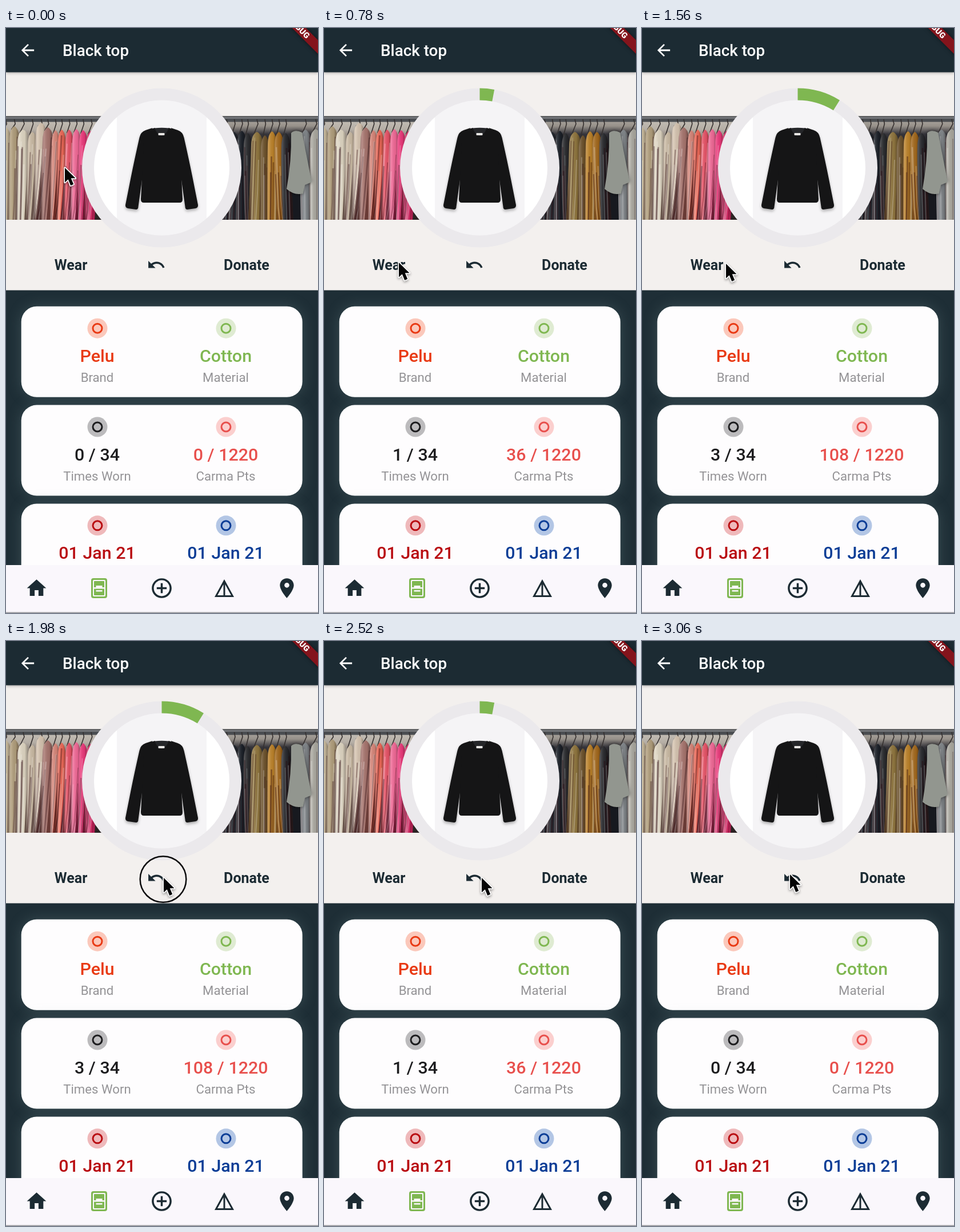
Write an HTML page with a canvas that moves like this. It is 546 by 1025 pixels and loops after 3.12 s.

```html
<!DOCTYPE html>
<html lang="en">
<head>
<meta charset="utf-8">
<title>Wardrobe item</title>
<style>
html, body { margin: 0; width: 100%; height: 100%; overflow: hidden; background: #1e2d35; }
canvas { display: block; width: 546px; height: 1025px; }
</style>
</head>
<body>
<canvas id="stage" width="546" height="1025"></canvas>
<script>
const W = 546, H = 1025, LOOP = 3120, STEP = 60;
const INK = '#1c2b33', PAPER = '#f3f0ee', GREEN = '#7fb751', NAV = '#faf7fc';
const CX = 272.5, CY = 245;
const CARD_TOP = 487.8, CARD_PITCH = 172.8;

const ICONS = {
  back: 'M20 11H7.83l5.59-5.59L12 4l-8 8 8 8 1.41-1.41L7.83 13H20v-2z',
  undo: 'M12.5 8c-2.65 0-5.05.99-6.9 2.6L2 7v9h9l-3.62-3.62c1.39-1.16 3.16-1.88 5.12-1.88 3.54 0 6.55 2.31 7.6 5.5l2.37-.78C21.08 11.03 17.15 8 12.5 8z',
  home: 'M10 20v-6h4v6h5v-8h3L12 3 2 12h3v8z',
  add: 'M13 7h-2v4H7v2h4v4h2v-4h4v-2h-4V7zm-1-5C6.48 2 2 6.48 2 12s4.48 10 10 10 10-4.48 10-10S17.52 2 12 2zm0 18c-4.41 0-8-3.59-8-8s3.59-8 8-8 8 3.59 8 8-3.59 8-8 8z',
  pin: 'M12 2C8.13 2 5 5.13 5 9c0 5.25 7 13 7 13s7-7.75 7-13c0-3.87-3.13-7-7-7zm0 9.5c-1.38 0-2.5-1.12-2.5-2.5s1.12-2.5 2.5-2.5 2.5 1.12 2.5 2.5-1.12 2.5-2.5 2.5z'
};

// Pointer path: time, x, y
const PATH = [
  [0, 102, 245], [60, 102, 245], [420, 130, 411], [1440, 130, 411], [1560, 146, 413],
  [1620, 150, 413], [1860, 275, 415], [2880, 275, 415], [3060, 258, 409]
];
// Press time and the change it makes on release
const CLICKS = [[600, 1], [900, 1], [1260, 1], [1920, -1], [2220, -1], [2700, -1]];
const HOLD = 120;

const stage = document.getElementById('stage').getContext('2d');
let g = stage;

let seed = 7;
function random() {
  seed = seed * 16807 % 2147483647;
  return seed / 2147483647;
}

function box(x, y, w, h, fill, r = 0) {
  g.fillStyle = fill;
  g.beginPath();
  g.roundRect(x, y, w, h, r);
  g.fill();
}

function disc(x, y, r, fill) {
  g.fillStyle = fill;
  g.beginPath();
  g.arc(x, y, r, 0, 7);
  g.fill();
}

function line(color, width, ...pts) {
  g.strokeStyle = color;
  g.lineWidth = width;
  g.beginPath();
  pts.forEach(([x, y]) => g.lineTo(x, y));
  g.stroke();
}

function text(str, x, y, size, weight, color, align = 'center') {
  g.font = `${weight} ${size}px Roboto, sans-serif`;
  g.textAlign = align;
  g.fillStyle = color;
  g.fillText(str, x, y);
}

function icon(name, x, y, scale, color) {
  g.save();
  g.translate(x - 12 * scale, y - 12 * scale);
  g.scale(scale, scale);
  g.fillStyle = color;
  g.fill(new Path2D(ICONS[name]));
  g.restore();
}

function shadow(color, blur, dy = 0) {
  g.shadowColor = color;
  g.shadowBlur = blur;
  g.shadowOffsetY = dy;
}

function fade(y0, y1, ...stops) {
  const f = g.createLinearGradient(0, y0, 0, y1);
  stops.forEach(([at, color]) => f.addColorStop(at, color));
  return f;
}

// One hanging garment: left, width, shoulder height, colour, lean
function garment(x, w, top, color, lean) {
  const low = x + lean;
  g.save();
  line('#35302f', 1.6, [x + w * .5, 160], [x + w * .6, 168], [x + w * .2, top + 6]);
  g.beginPath();
  g.moveTo(low, 338);
  g.quadraticCurveTo(x - 1, 250, x, top + 22);
  g.quadraticCurveTo(x + 1, top + 4, x + w * .5, top);
  g.quadraticCurveTo(x + w, top + 4, x + w + 1, top + 26);
  g.quadraticCurveTo(x + w + 2, 250, low + w + 3, 338);
  g.closePath();
  g.fillStyle = color;
  g.fill();
  g.clip();
  const fold = g.createLinearGradient(x - 3, 0, x + w + 3, 0);
  fold.addColorStop(0, 'rgba(30,8,8,.6)');
  fold.addColorStop(.25, 'rgba(255,255,255,.16)');
  fold.addColorStop(.6, 'rgba(0,0,0,.06)');
  fold.addColorStop(1, 'rgba(30,8,8,.6)');
  g.fillStyle = fold;
  g.fillRect(x - 20, top, w + 50, 180);
  for (let i = 0; i < 5; i++) {
    const from = x + w * random(), y = top + 10 + 70 * random();
    const tone = i % 2 ? '255,255,255,.22' : '40,5,10,.34';
    line(`rgba(${tone})`, 1 + 2 * random(), [from, y], [from + lean * .4, y + 60], [from + lean, 338]);
  }
  g.restore();
}

function rack() {
  g.save();
  g.beginPath();
  g.rect(0, 154, W, 182);
  g.clip();
  box(0, 154, 272, 182, fade(154, 250, [0, '#c9c4bc'], [.25, '#b5aea5'], [.6, '#4a3c38'], [1, '#2b2323']));
  box(272, 154, 274, 182, fade(154, 225, [0, '#b5b0a9'], [.25, '#97918a'], [.45, '#35343a'], [1, '#17191f']));
  box(0, 154.5, W, 10, '#4a4d51');
  box(0, 156.5, W, 2, '#85878a');
  const left = [
    [-9, 17, 174, '#cfc0a1', -2], [6, 17, 172, '#b3a07d', -3], [20, 20, 178, '#e2d9c5', -3],
    [38, 16, 182, '#cdbda6', -6], [52, 19, 166, '#d8c6b2', -9], [64, 18, 174, '#a9766f', -13],
    [80, 13, 179, '#d9877a', -9], [91, 13, 178, '#f06a58', -9], [104, 13, 178, '#ea5468', -9],
    [116, 14, 177, '#f46a98', -9], [128, 14, 179, '#ee3a7c', -7], [140, 18, 180, '#d52864', -6]
  ];
  const right = [
    [378, 16, 181, '#20252c', -2], [392, 15, 182, '#24282f', -3], [405, 15, 180, '#1b2028', 0],
    [416, 14, 184, '#2b2c2f', 2], [429, 20, 182, '#927840', -5], [446, 14, 188, '#6d522b', 0],
    [458, 15, 181, '#bf842a', -1], [470, 15, 182, '#a56a1d', 5], [482, 15, 184, '#2a2b2f', 3],
    [515, 18, 178, '#858a8e', 1], [532, 20, 177, '#aaa89f', 0]
  ];
  left.concat(right).forEach(a => garment(...a));
  g.fillStyle = '#92968f';
  shadow('rgba(0,0,0,.6)', 6);
  g.fill(new Path2D('M499 184Q506 177 518 183L535 270L523 275L520 290Q505 294 491 282Q500 232 499 184Z'));
  shadow('transparent', 0);
  g.restore();
}

function sleeve(side) {
  g.save();
  g.translate(CX, 0);
  g.scale(side, 1);
  g.fill(new Path2D('M-16 175L-28 179Q-37 182 -39 192Q-48 232 -54 262L-63.5 310Q-64 315 -59 316L-45 318Q-41 318 -41 313L-35 270L-25 192Z'));
  g.restore();
}

function portrait() {
  disc(CX, CY, 129, '#fff');
  g.save();
  g.beginPath();
  g.arc(CX, CY, 119, 0, 7);
  g.clip();
  box(194, 120, 157, 250, '#f5f4f6');
  g.fillStyle = '#151516';
  shadow('rgba(0,0,0,.3)', 5, 3);
  sleeve(-1);
  sleeve(1);
  shadow('transparent', 0);
  g.fill(new Path2D('M260 175Q272.5 184 285 175L303 181L309 300Q309 306 304 306H241Q236 306 236 300L242 181Z'));
  g.fillStyle = '#252629';
  g.fill(new Path2D('M260 175.5Q272.5 174 285 175.5Q272.5 203 260 175.5Z'));
  box(266.5, 184, 11, 4, '#e8e6e3', 1);
  g.restore();
}

function ring(share) {
  g.lineWidth = 21;
  g.strokeStyle = '#ebe9ec';
  g.beginPath();
  g.arc(CX, CY, 129, 0, 7);
  g.stroke();
  if (!share) return;
  g.strokeStyle = GREEN;
  g.beginPath();
  g.arc(CX, CY, 129, -Math.PI / 2, -Math.PI / 2 + share * Math.PI * 2);
  g.stroke();
}

function badge(x, y, color, halo) {
  disc(x, y, 17.5, halo);
  g.strokeStyle = color;
  g.lineWidth = 3;
  g.beginPath();
  g.arc(x, y, 8, 0, 7);
  g.stroke();
}

function cellValue(value, row, column, color) {
  text(value, column ? 384.5 : 159.5, CARD_TOP + row * CARD_PITCH + 97, 30.4, 500, color);
}

function card(row, cells) {
  const y = CARD_TOP + row * CARD_PITCH;
  shadow('rgba(150,180,180,.22)', 26);
  box(26.7, y, 492, 159, '#fefdfe', 27);
  shadow('transparent', 0);
  cells.forEach(([value, label, color, halo], i) => {
    const x = i ? 385 : 160;
    badge(x, y + 38.4, color, halo);
    cellValue(value, row, i, color);
    text(label, x - .5, y + 132, 22.2, 400, '#949396');
  });
}

function debugBanner() {
  g.save();
  g.translate(W, 0);
  g.rotate(Math.PI / 4);
  shadow('rgba(0,0,0,.5)', 7);
  box(-80, 15, 120, 17, '#84141c');
  shadow('transparent', 0);
  text('DEBUG', -23.5, 28, 14.2, 900, '#fff');
  g.restore();
}

function navBar() {
  box(0, 941, W, 84, NAV);
  box(0, 1023.5, W, 1.5, '#97989c');
  icon('home', 53.5, 981.5, 1.69, INK);
  box(149, 964, 28, 35, GREEN, 4);
  box(152, 967, 22, 29, NAV, 2);
  box(154, 969, 18, 25, GREEN, 1);
  box(154, 980, 18, 2.5, NAV);
  box(157.5, 977, 11, 3.5, NAV);
  box(157.5, 985, 11, 2.5, NAV);
  icon('add', 272.5, 981.5, 1.736, INK);
  g.lineJoin = 'miter';
  g.strokeStyle = INK;
  g.lineWidth = 3;
  g.stroke(new Path2D('M382 969L367.5 995.5H396.5ZM382 969V995'));
  icon('pin', 491.5, 981.5, 1.736, INK);
}

function paintStill() {
  box(0, 0, W, H, '#1e2e36');
  card(0, [['Pelu', 'Brand', '#e93a14', '#fbc8bb'], ['Cotton', 'Material', GREEN, '#dfebd2']]);
  card(1, [['', 'Times Worn', '#1d1d1f', '#bcbbbd'], ['', 'Carma Pts', '#e8504d', '#fbcfce']]);
  card(2, [['01 Jan 21', 'Purchased', '#b90d12', '#efb9bb'], ['01 Jan 21', 'Last Worn', '#0b3d96', '#b3c6e5']]);
  box(0, 77, W, 382.5, PAPER);
  rack();
  shadow('rgba(0,0,0,.35)', 5, 1.5);
  box(0, 0, W, 77.5, INK);
  shadow('transparent', 0);
  icon('back', 38, 39, 1.389, '#fff');
  text('Black top', 99, 49, 27.8, 500, '#fff', 'left');
  debugBanner();
  portrait();
  text('Wear', 113.5, 424, 25, 700, INK);
  text('Donate', 421, 424, 25, 700, INK);
  icon('undo', 263, 415, 1.389, INK);
  navBar();
}

function pointerAt(t) {
  let i = 1;
  while (i < PATH.length - 1 && t > PATH[i][0]) i++;
  const [t0, x0, y0] = PATH[i - 1], [t1, x1, y1] = PATH[i];
  const p = Math.min(1, (t - t0) / (t1 - t0));
  const e = p * p * (3 - 2 * p);
  return [x0 + (x1 - x0) * e, y0 + (y1 - y0) * e];
}

function pointer(x, y, pressed) {
  if (pressed) {
    g.strokeStyle = '#0b0b0c';
    g.lineWidth = 2.5;
    g.beginPath();
    g.arc(x, y + 2.5, 40.3, 0, 7);
    g.stroke();
  }
  g.save();
  g.translate(x, y);
  const arrow = new Path2D('M1 0V25.5L6.8 20.2L11.2 31L16.2 28.8L11.8 18.3H19.5Z');
  g.lineJoin = 'round';
  g.strokeStyle = '#fff';
  g.lineWidth = 3.4;
  shadow('rgba(0,0,0,.4)', 4, 2);
  g.stroke(arrow);
  shadow('transparent', 0);
  g.fillStyle = '#050505';
  g.fill(arrow);
  g.restore();
}

const still = document.createElement('canvas');
still.width = W;
still.height = H;
g = still.getContext('2d');
paintStill();
g = stage;

const start = performance.now();

function draw(now) {
  const t = Math.floor(Math.max(0, now - start) % LOOP / STEP) * STEP;
  const worn = CLICKS.reduce((n, [at, d]) => n + (t >= at + HOLD ? d : 0), 0);
  const pressed = CLICKS.some(([at]) => t >= at && t < at + HOLD);
  g.drawImage(still, 0, 0);
  ring(worn / 34);
  cellValue(`${worn} / 34`, 1, 0, '#1d1d1f');
  cellValue(`${worn * 36} / 1220`, 1, 1, '#e8504d');
  pointer(...pointerAt(t), pressed);
  requestAnimationFrame(draw);
}
requestAnimationFrame(draw);
</script>
</body>
</html>
```
